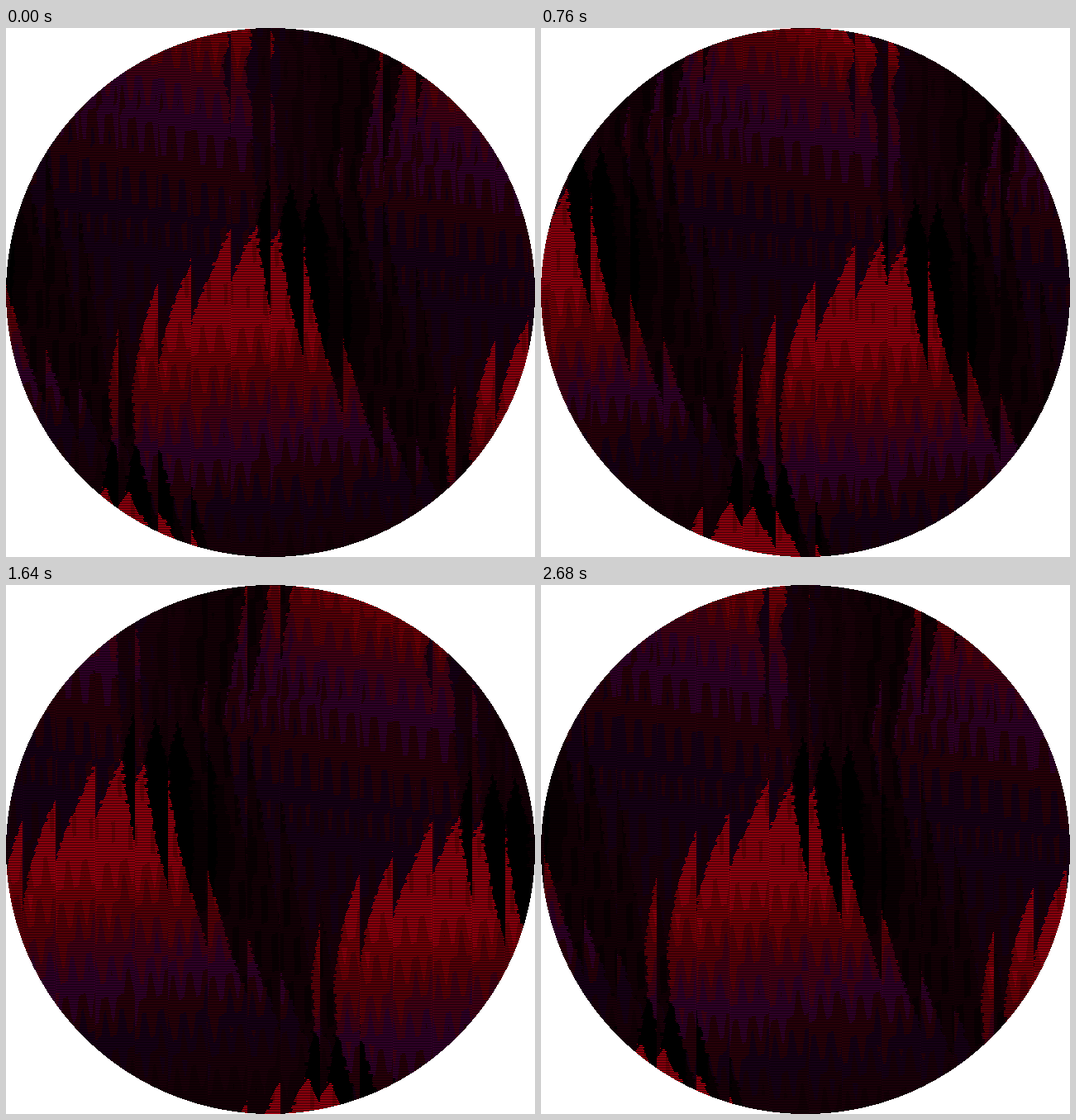
An HTML page with a canvas for the animation above (2720 ms loop, 640x640 px).

```html
<!DOCTYPE html>
<html lang="en">
<head>
<meta charset="utf-8">
<title>Lenticular flames</title>
<style>
html, body { margin: 0; width: 100%; height: 100%; overflow: hidden; background: #fff; }
canvas { display: block; }
</style>
</head>
<body>
<canvas id="stage" width="640" height="640"></canvas>
<script>
const SIZE = 640, STEP_MS = 40, STEPS = 68;
const STRIPE = 136 / 3;                // stripe pitch
const SHIFT_U = 27.2, SHIFT_V = 4.533; // texture offset from one stripe to the next
const TILE_U = 163.2, TILE_V = 27.2;   // texture repeat vector
const U0 = 220, V0 = -80, TEX_W = Math.ceil(TILE_U), TEX_H = 800;

const clamp = (value, low, high) => Math.max(low, Math.min(high, value));

// Dim curtain beside the upper flame
function curtain(u, v) {
  if (u > 316 && u < 400 && v < 235) return clamp(4 - (u - 318) * .05, 1.5, 4);
}

// Upper flame, fading downwards
function upperFlame(u, v) {
  const left = 208 + .17 * Math.abs(v - 154);
  const sway = 7 * clamp(1 - v / 160, 0, 1) * Math.cos((v - 19) * .07);
  const right = 316 + .06 * v + sway;
  if (u < left || u > right) return;
  return 2.6 + 6.2 * Math.exp(-(v - .5 * (u - 270)) / 180);
}

// Pointed flame: bulges left in an arc, trails off to the lower right
function flame(tipU, tipV, spread, bend) {
  return (u, v) => {
    const y = v - tipV, x = u - tipU;
    if (y < 0 || y > 450) return;
    const left = -69 * Math.sin(Math.PI / 2 * y / 227);
    const right = spread * (y / 296) ** bend;
    if (x < left || x > right) return;
    return clamp(10 - (y + .6 * x - 110) * .026, 2, 10);
  };
}

// Black finger above a flame tip, softening to the right
function finger(tipU, tipV) {
  return (u, v) => {
    const y = v - tipV, x = u - tipU;
    if (y < 0 || y > 225) return;
    const left = -Math.min(9, .2 * y);
    const right = Math.min(36, 1 + .3 * y);
    if (x > left && x < right) return clamp((x - 8) / 22, 0, 1.3);
  };
}

const layers = [
  curtain, upperFlame,
  finger(342, 187), flame(330, 241, 78, 1.5),
  finger(262, 519), flame(254, 577, 170, 1)
];

function paint(u, v) {
  let level = 1.6;
  for (const layer of layers) {
    for (let copy = -2; copy <= 2; copy++) {
      level = layer(u - copy * TILE_U, v - copy * TILE_V) ?? level;
    }
  }
  return level;
}

// Posterise the painting with crossing blade-like ripples and ragged edges
function buildLevels() {
  const levels = new Uint8Array(TEX_W * TEX_H);
  const triangle = t => 4 * Math.abs(t - Math.floor(t) - .5) - 1;
  for (let y = 0; y < TEX_H; y++) {
    const row = y >> 2;
    const noise = Math.sin(row * 127.1) * 43758.5453;
    const jitter = (noise - Math.floor(noise) - .5) * 5;
    for (let x = 0; x < TEX_W; x++) {
      const u = x + U0 + jitter;
      const blade = 8 * x / TILE_U, w = y - x / 6;
      const raw = paint(u, y + V0);
      const ripple = .5 * triangle(blade + w / 150) + .4 * triangle(blade - w / 90);
      levels[y * TEX_W + x] = clamp(Math.round(raw + ripple * Math.min(1, raw / 3)), 0, 10);
    }
  }
  return levels;
}

// From black through maroon, violet and crimson to bright red
const palette = Uint32Array.from(
  [0x000000, 0x100004, 0x200009, 0x2a000e, 0x240022, 0x40000e,
    0x4c003e, 0x690020, 0x8c000c, 0xb4000a, 0xe10014],
  c => (0xff000000 | (c & 255) << 16 | c & 0xff00 | c >> 16) >>> 0);
const BLACK = palette[0];

const ctx = document.getElementById('stage').getContext('2d');
const image = ctx.createImageData(SIZE, SIZE);
const pixels = new Uint32Array(image.data.buffer).fill(0xffffffff);
const levels = buildLevels();
const columns = new Int32Array(SIZE), offsets = new Int32Array(SIZE), parity = new Uint8Array(SIZE);

function draw(step) {
  for (let x = 0; x < SIZE; x++) {
    const cell = Math.floor((x + 4 * step) / 8) * 8;
    const stripe = Math.floor((cell + 7.9 - 48) / STRIPE);
    const u = x - SHIFT_U * (stripe - 6) - U0;
    const tile = Math.floor(u / TILE_U);
    columns[x] = Math.floor(u - tile * TILE_U);
    offsets[x] = Math.round(-SHIFT_V * (stripe - 6) - TILE_V * tile - V0);
    parity[x] = stripe & 1;
  }
  const radius = SIZE / 2;
  for (let y = 0; y < SIZE; y++) {
    const dy = y + .5 - radius;
    const half = Math.sqrt(radius * radius - dy * dy);
    const end = Math.round(radius + half);
    for (let x = Math.round(radius - half); x < end; x++) {
      // neighbouring stripes are lit on opposite scanlines
      const lit = (y & 1) === parity[x];
      const row = clamp(y + offsets[x], 0, TEX_H - 1);
      pixels[y * SIZE + x] = lit ? palette[levels[row * TEX_W + columns[x]]] : BLACK;
    }
  }
  ctx.putImageData(image, 0, 0);
}

let shown = -1;
function tick() {
  const step = Math.floor(performance.now() / STEP_MS) % STEPS;
  if (step !== shown) draw(shown = step);
  requestAnimationFrame(tick);
}
tick();
</script>
</body>
</html>
```
